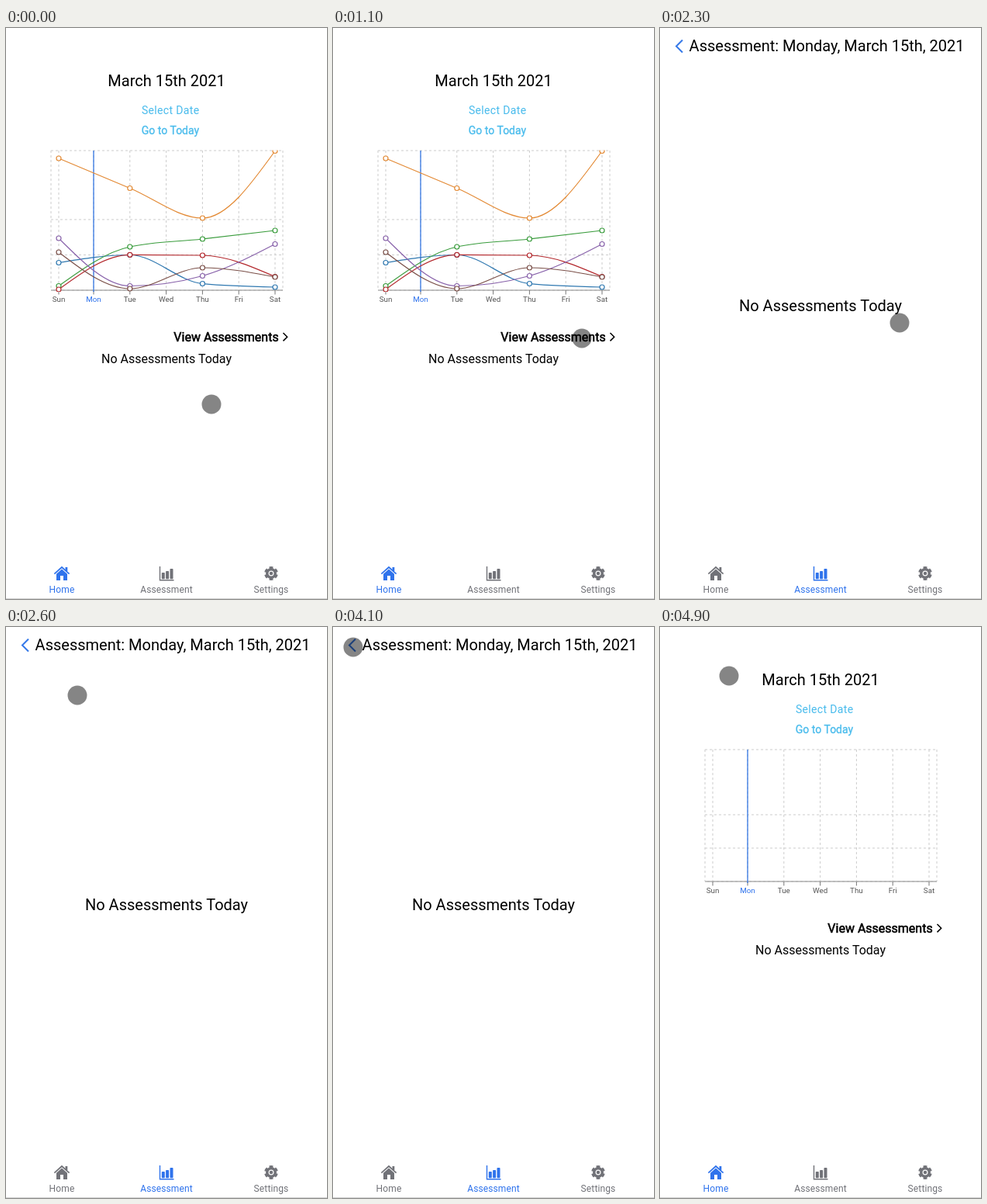
Animation, 414 px wide and 736 px high, one loop 5 s. Source, as an HTML page:

```html
<!DOCTYPE html>
<html lang="en">
<head>
<meta charset="utf-8">
<title>Assessment tabs</title>
<style>
  html, body { margin: 0; width: 100%; height: 100%; overflow: hidden; background: #fff; }
  svg { display: block; width: 414px; height: 736px; font-family: Roboto, sans-serif; --blue: #2f73ec; --gray: #717278; }
  .big { font-size: 20px; }
  .mid { font-size: 16px; }
  .link { font-size: 14px; fill: #48bbec; }
  .heavy { stroke: currentColor; stroke-width: .55; }
  .day { font-size: 9.8px; fill: #555; }
  .center, .tab { text-anchor: middle; }
  .line { fill: none; }
  .grid { stroke: #ccc; stroke-dasharray: 3 3; }
  .tab { font-size: 12px; letter-spacing: .12px; color: var(--gray); fill: currentColor; }

  .home, .report, .filled, .empty, .tab, #pointer { animation: 5s step-end infinite; }
  .home { animation-name: home; }
  .report { animation-name: report; }
  .filled { animation-name: filled; }
  .empty { animation-name: empty; }
  .tab.first { animation-name: first; }
  .tab.second { animation-name: second; }
  #pointer { animation-name: move; }

  @keyframes home { 0%, 90% { visibility: visible } 32% { visibility: hidden } }
  @keyframes report { 0%, 90% { visibility: hidden } 32% { visibility: visible } }
  @keyframes filled { 0% { visibility: visible } 32% { visibility: hidden } }
  @keyframes empty { 0% { visibility: hidden } 90% { visibility: visible } }
  @keyframes first { 0%, 90% { color: var(--blue) } 32% { color: var(--gray) } }
  @keyframes second { 0%, 90% { color: var(--gray) } 32% { color: var(--blue) } }
  @keyframes move {
    0% { transform: translate(265px, 485px) }
    2% { transform: translate(274px, 463px) }
    4% { transform: translate(287px, 432px) }
    6% { transform: translate(298px, 408px) }
    8% { transform: translate(302px, 399px) }
    12% { transform: translate(304px, 399px) }
    14% { transform: translate(308px, 399px) }
    16% { transform: translate(313px, 399px) }
    18% { transform: translate(317px, 400px) }
    20% { transform: translate(320px, 400px) }
    22% { transform: translate(321px, 400px) }
    46% { transform: translate(309px, 380px) }
    48% { transform: translate(248px, 296px) }
    50% { transform: translate(156px, 172px) }
    52% { transform: translate(92px, 88px) }
    54% { transform: translate(72px, 55px) }
    56% { transform: translate(64px, 42px) }
    58% { transform: translate(52px, 33px) }
    60% { transform: translate(43px, 28px) }
    62% { transform: translate(36px, 27px) }
    64% { transform: translate(31px, 26px) }
    66% { transform: translate(28px, 26px) }
    68% { transform: translate(26px, 26px) }
    92% { transform: translate(35px, 31px) }
    94% { transform: translate(56px, 43px) }
    96% { transform: translate(78px, 57px) }
    98% { transform: translate(89px, 63px) }
  }
</style>
</head>
<body>
<svg viewBox="0 0 414 736">
  <defs>
    <clipPath id="plot"><rect x="50" y="157.5" width="315" height="182.5"/></clipPath>
    <g id="summary">
      <g color="#000"><text class="mid heavy" x="351.7" y="404" text-anchor="end">View Assessments</text></g>
      <path class="line" d="M357.5 393l5.2 5.2-5.2 5.2" stroke="#000" stroke-width="1.5"/>
      <text class="mid center" x="207" y="432">No Assessments Today</text>
    </g>
  </defs>

  <g class="home">
    <text class="big center" x="207" y="75">March 15th 2021</text>
    <text class="link center" x="212.2" y="111" letter-spacing=".35">Select Date</text>
    <text class="link center" x="212" y="137" stroke="#48bbec" stroke-width=".3">Go to Today</text>
  </g>
  <g class="filled">
    <g id="full"></g>
    <use href="#summary"/>
  </g>
  <g class="empty">
    <g id="bare"></g>
    <use href="#summary" y="-10"/>
  </g>

  <g class="report">
    <path class="line" d="M29 15.5l-8 8 8 8" stroke="#3478e8" stroke-width="2"/>
    <text class="big" x="37.6" y="30">Assessment: Monday, March 15th, 2021</text>
    <text class="big center" x="207" y="365">No Assessments Today</text>
  </g>

  <g class="tab first">
    <path class="line" d="M62.4 703.6l9.6-8.6 9.6 8.6" stroke="currentColor" stroke-width="1.7"/>
    <path d="M76.5 695h2.8v5h-2.8zM65 703.7l7-6.3 7 6.3v8.3h-5v-6h-4v6h-5z"/>
    <text x="72" y="728">Home</text>
  </g>
  <g class="tab second">
    <path class="line" d="M198.5 694v17.8h18" stroke="currentColor" stroke-width="1.4"/>
    <rect x="200.8" y="702" width="4" height="8.2" rx=".8"/>
    <rect x="206.1" y="700" width="4" height="10.2" rx=".8"/>
    <rect x="211.5" y="697" width="4" height="13.2" rx=".8"/>
    <text x="207" y="728">Assessment</text>
  </g>
  <g class="tab">
    <circle cx="342" cy="703" r="7"/>
    <circle class="line" cx="342" cy="703" r="7.4" stroke="currentColor" stroke-width="3"
      stroke-dasharray="60 40" pathLength="600" transform="rotate(-108 342 703)"/>
    <circle class="line" cx="342" cy="703" r="2.9" stroke="#fff" stroke-width="1.2"/>
    <text x="342" y="728">Settings</text>
  </g>
  <path d="M0 735.5h414" stroke="#d4d4d4"/>
  <circle id="pointer" r="12.5" fill="#000" fill-opacity=".48"/>
</svg>

<script>
  const LEFT = 58, RIGHT = 357, TOP = 158;
  const days = ['Sun', 'Mon', 'Tue', 'Wed', 'Thu', 'Fri', 'Sat'];
  const dayX = i => i ? 113 + 46.8 * (i - 1) : 68;
  const series = [
    ['#2f78b0', [302.5, 292.5, 329.5, 334]],
    ['#e38a35', [168, 206.5, 245, 158.5]],
    ['#3a9c3d', [332.5, 282, 272, 261]],
    ['#b3282d', [337, 292.3, 293, 320.5]],
    ['#8862aa', [271, 332.5, 319.5, 278.5]],
    ['#7a4f48', [289, 336, 309, 321]]
  ];
  const line = (x1, y1, x2, y2, attrs) =>
    `<line x1="${x1}" y1="${y1}" x2="${x2}" y2="${y2}" ${attrs}/>`;

  // Cubic path that never overshoots its points
  function monotone(xs, ys) {
    const h = xs.slice(1).map((x, i) => x - xs[i]);
    const s = h.map((w, i) => (ys[i + 1] - ys[i]) / w);
    const m = xs.map((_, i) => {
      if (!i || i > s.length - 1) return 0;
      const p = (s[i - 1] * h[i] + s[i] * h[i - 1]) / (h[i - 1] + h[i]);
      return (Math.sign(s[i - 1]) + Math.sign(s[i])) *
        Math.min(Math.abs(s[i - 1]), Math.abs(s[i]), Math.abs(p) / 2);
    });
    const n = s.length;
    m[0] = (3 * s[0] - m[1]) / 2;
    m[n] = (3 * s[n - 1] - m[n - 1]) / 2;
    return `M${xs[0]} ${ys[0]}` + h.map((w, i) => {
      const d = w / 3;
      return `C${xs[i] + d} ${ys[i] + d * m[i]} ${xs[i + 1] - d} ${ys[i + 1] - d * m[i + 1]} ${xs[i + 1]} ${ys[i + 1]}`;
    }).join('');
  }

  function axes(bottom) {
    const rows = [0, .494, .747, 1].map(f => TOP + f * (bottom - TOP));
    const cols = [LEFT, ...days.map((_, i) => dayX(i)), RIGHT];
    return line(LEFT, bottom, RIGHT, bottom, 'stroke="#777"') +
      rows.map(y => line(LEFT, y, RIGHT, y, 'class="grid"')).join('') +
      cols.map(x => line(x, TOP, x, bottom, 'class="grid"')).join('') +
      days.map((day, i) => {
        const x = dayX(i), fill = i === 1 ? 'style="fill:var(--blue)"' : '';
        return line(x, bottom, x, bottom + 5.5, 'stroke="#777"') +
          `<text class="day center" x="${x}" y="${bottom + 15}" ${fill}>${day}</text>`;
      }).join('') +
      line(113, TOP, 113, bottom + 2, 'stroke="#4280e6" stroke-width="1.4"');
  }

  function curves() {
    const xs = [0, 2, 4, 6].map(dayX);
    const paths = series.map(([color, ys]) =>
      `<path class="line" d="${monotone(xs, ys)}" stroke="${color}" stroke-width="1.2"/>`);
    const dots = series.map(([color, ys]) => ys.map((y, i) =>
      `<circle cx="${xs[i]}" cy="${y}" r="3" fill="#fff" stroke="${color}" stroke-width="1.2"/>`).join(''));
    return `<g clip-path="url(#plot)">${paths.join('')}${dots.join('')}</g>`;
  }

  document.getElementById('full').innerHTML = axes(338) + curves();
  document.getElementById('bare').innerHTML = axes(328);
</script>
</body>
</html>
```
